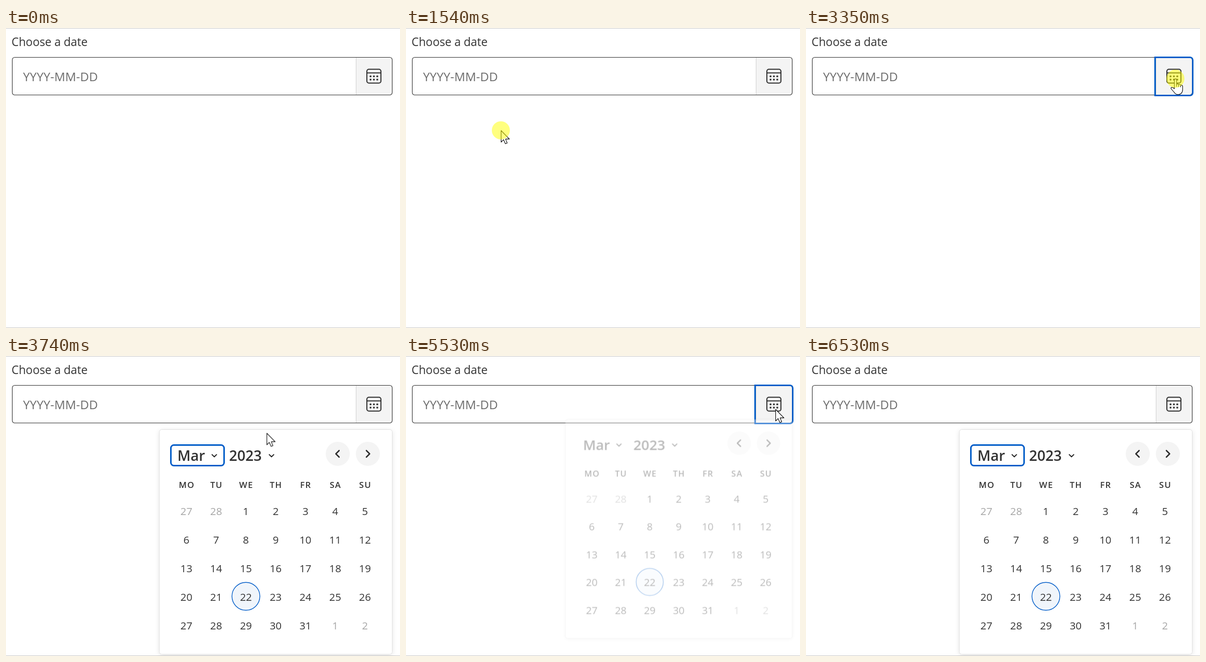
Recreate the animation shown at these times as an HTML page. Size 785 px wide and 598 px high, loop 6.93 s.

```html
<!DOCTYPE html>
<html lang="en">
<head>
<meta charset="utf-8">
<title>Date picker</title>
<style>
html, body { margin: 0; width: 100%; height: 100%; overflow: hidden; background: #fff; }
svg { display: block; width: 785px; height: 598px; font-family: "Open Sans", "Noto Sans", sans-serif; fill: #333; }
.line { fill: none; stroke: #2b2b2b; stroke-width: 2; stroke-linecap: round; stroke-linejoin: round; }
.ring { fill: none; stroke: #005cc8; stroke-width: 3; }
.title { font-size: 28.5px; font-weight: 600; }
.weekday { font-size: 17px; font-weight: 600; letter-spacing: 1.3px; text-anchor: middle; }
.day { font-size: 20.7px; text-anchor: middle; }
.muted { fill: #a6a6a6; }
.cursor { fill: #fff; stroke: #000; stroke-width: 1.1; stroke-linejoin: round; }

/* One 6930 ms loop; 1% is 69.3 ms. */
.anim { animation: 6930ms step-end infinite; }
#fieldRing { animation-name: field-ring; }
#caret { animation-name: caret; }
#buttonRing { animation-name: button-ring; }
#monthRing { animation-name: month-ring; }
#popup { animation-name: popup; transform-origin: 770px 147px; }
#pointer { animation-name: move; }
#click { animation-name: click; }
#arrow { animation-name: arrow; }
#beam { animation-name: beam; }
#hand { animation-name: hand; }

@keyframes field-ring {
  0%, 22.22%, 48.34%, 100% { opacity: 0; }
  9.81%, 26.54% { opacity: 1; }
}
@keyframes caret {
  0%, 22.22%, 40.69%, 100% { opacity: 0; }
  9.81%, 26.54% { opacity: 1; }
}
@keyframes button-ring {
  0%, 53.75%, 81.95%, 100% { opacity: 0; }
  48.34%, 77.77% { opacity: 1; }
}
@keyframes month-ring {
  0%, 68.68% { opacity: 0; }
  53.75%, 81.95%, 100% { opacity: 1; }
}
@keyframes popup {
  0%, 72.95% { opacity: 0; transform: translateY(-30px) scale(.961); }
  50.5%, 78.71% { opacity: 0; transform: translateY(-30px) scale(.961); animation-timing-function: steps(3); }
  53.75%, 81.95%, 100% { opacity: 1; transform: none; }
  69.69% { opacity: 1; transform: none; animation-timing-function: steps(3); }
}
@keyframes click {
  0%, 10.82%, 23.22%, 28.71%, 50.5%, 69.69%, 78.92%, 100% { opacity: 0; }
  9.81%, 22.22%, 26.54%, 48.34%, 68.68%, 77.77% { opacity: 1; }
}
@keyframes arrow {
  0%, 8.65%, 25.39%, 76.62%, 94.22%, 100% { opacity: 0; }
  1.01%, 15.5%, 51.6%, 78.92% { opacity: 1; }
}
@keyframes beam {
  0%, 15.5%, 42.41%, 100% { opacity: 0; }
  8.65%, 25.39% { opacity: 1; }
}
@keyframes hand {
  0%, 51.6%, 78.92%, 100% { opacity: 0; }
  42.41%, 76.62% { opacity: 1; }
}
@keyframes move {
  0% { transform: translate(300px, 499px); }
  1.01% { transform: translate(300px, 499px); animation-timing-function: steps(7); }
  8.65% { transform: translate(222px, 112px); }
  9.81% { transform: translate(220px, 105px); }
  12.26% { transform: translate(220px, 105px); animation-timing-function: steps(8); }
  21.06% { transform: translate(189px, 204px); }
  23.22% { transform: translate(189px, 204px); animation-timing-function: steps(2); }
  25.39% { transform: translate(190px, 112px); }
  28.71% { transform: translate(190px, 112px); animation-timing-function: steps(6); }
  35.78% { transform: translate(196px, 113px); animation-timing-function: steps(2); }
  37.95% { transform: translate(453px, 77px); }
  39.68% { transform: translate(560px, 85px); animation-timing-function: steps(3); }
  42.41% { transform: translate(736px, 101px); }
  50.5% { transform: translate(736px, 101px); animation-timing-function: steps(8); }
  59.59% { transform: translate(158px, 241px); }
  60.6% { transform: translate(157px, 241px); }
  69.69% { transform: translate(157px, 241px); animation-timing-function: steps(7); }
  76.62% { transform: translate(736px, 101px); }
  78.92% { transform: translate(736px, 106px); }
  83.1% { transform: translate(736px, 106px); animation-timing-function: steps(5); }
  88.74% { transform: translate(718px, 130px); animation-timing-function: steps(5); }
  94.22%, 100% { transform: translate(668px, 700px); }
}
</style>
</head>
<body>
<svg viewBox="0 0 785 598">
  <path d="M0 .5H785M0 597.5H785" stroke="#c8c8c8"/>
  <text x="11" y="36" font-size="22.8">Choose a date</text>

  <rect x="12.5" y="58.5" width="757" height="75" rx="5" fill="#fff"/>
  <path d="M698 59H765a4.5 4.5 0 0 1 4.5 4.5V129a4.5 4.5 0 0 1-4.5 4.5H698z" fill="#f4f4f4"/>
  <path d="M697.5 59V133" stroke="#cfcfcf"/>
  <rect x="12.5" y="58.5" width="757" height="75" rx="5" fill="none" stroke="#2b2b2b" stroke-width="1.1"/>
  <text x="34" y="106" font-size="24" letter-spacing=".15" fill="#6c6c6c">YYYY-MM-DD</text>
  <g id="icon">
    <rect class="line" x="719" y="82.3" width="28" height="27.4" rx="4"/>
    <path class="line" d="M719 89.5H747"/>
  </g>
  <rect id="fieldRing" class="ring anim" x="11.7" y="57.7" width="758.6" height="76.6" rx="6" style="stroke-width:2.6"/>
  <path id="caret" class="anim" d="M35 80V112" stroke="#000" stroke-width="1.6"/>
  <path id="buttonRing" class="ring anim" d="M695.5 58.5H765a5.5 5.5 0 0 1 5.5 5.5V129a5.5 5.5 0 0 1-5.5 5.5H695.5z"/>

  <g id="popup" class="anim">
    <rect x="305.5" y="146.5" width="464" height="448" rx="5" fill="#fff" stroke="#e0e0e0" style="filter:drop-shadow(0 2px 5px rgba(0,0,0,.1))"/>
    <text class="title" x="341.5" y="208.5">Mar</text>
    <text class="title" x="444.5" y="208.5">2023</text>
    <path class="line" d="M410.5 196.5l4.5 4.5 4.5-4.5M524.5 196.5l4.5 4.5 4.5-4.5"/>
    <rect id="monthRing" class="ring anim" x="328.5" y="177.5" width="106" height="41" rx="6"/>
    <circle cx="661" cy="195" r="24" fill="#f4f4f4"/>
    <circle cx="721" cy="195" r="24" fill="#f4f4f4"/>
    <path class="line" d="M663.7 188.5l-6.5 6.5 6.5 6.5M718 188.5l6.5 6.5-6.5 6.5" stroke-width="2.6" style="stroke-width:2.6"/>
    <circle cx="478" cy="479" r="27.8" fill="#f0f5fb" stroke="#005cc8" stroke-width="1.4"/>
  </g>

  <g id="pointer" class="anim">
    <path id="arrow" class="cursor anim" d="M.5 .5V23.5L5.4 18.7 9 26.8 12.6 25.3 9.3 17.4H17z"/>
    <path id="beam" class="anim" d="M-6-12H-1.5Q0-12 0-10.5Q0-12 1.5-12H7M0-11V11M-6 12H-1.5Q0 12 0 10.5Q0 12 1.5 12H7" fill="none" stroke="#000" stroke-width="1.7"/>
    <path id="hand" class="cursor anim" d="M-2 20V2.6a2.2 2.2 0 0 1 4.4 0V11q2.2-1.6 4 .8 2.2-1.4 4 .9 3-.6 4 2.3V22q0 4.500-3 7.500-2.500 2.200-6 2.200-5 0-7.500-4.200L-8.300 20.500q-1.200-3 1.300-3.200Q-5 17.200-2 20zM2.400 11V16M6.400 12V16.500M10.400 13V17"/>
    <circle id="click" class="anim" r="18" fill="#ff0" fill-opacity=".5"/>
  </g>
</svg>
<script>
const NS = "http://www.w3.org/2000/svg";
const popup = document.getElementById("popup");
const icon = document.getElementById("icon");

function add(parent, tag, attrs, text = "") {
  const el = document.createElementNS(NS, tag);
  for (const key in attrs) el.setAttribute(key, attrs[key]);
  el.textContent = text;
  parent.append(el);
}

const columnX = col => 359.4 + col * 59.3;

"MO TU WE TH FR SA SU".split(" ").forEach((name, col) =>
  add(popup, "text", { class: "weekday", x: columnX(col) + .6, y: 263 }, name));

// Five weeks from 27 February to 2 April.
for (let i = 0; i < 35; i++) {
  const day = i - 1;
  const outside = day < 1 || day > 31;
  const label = day < 1 ? day + 28 : day > 31 ? day - 31 : day;
  add(popup, "text", {
    class: outside ? "day muted" : "day",
    x: columnX(i % 7),
    y: 316.5 + Math.floor(i / 7) * 57
  }, label);
}

for (let i = 0; i < 6; i++) {
  add(icon, "circle", { cx: 726.3 + i % 3 * 6.7, cy: i < 3 ? 96.3 : 102.8, r: 1.9 });
}
</script>
</body>
</html>
```
